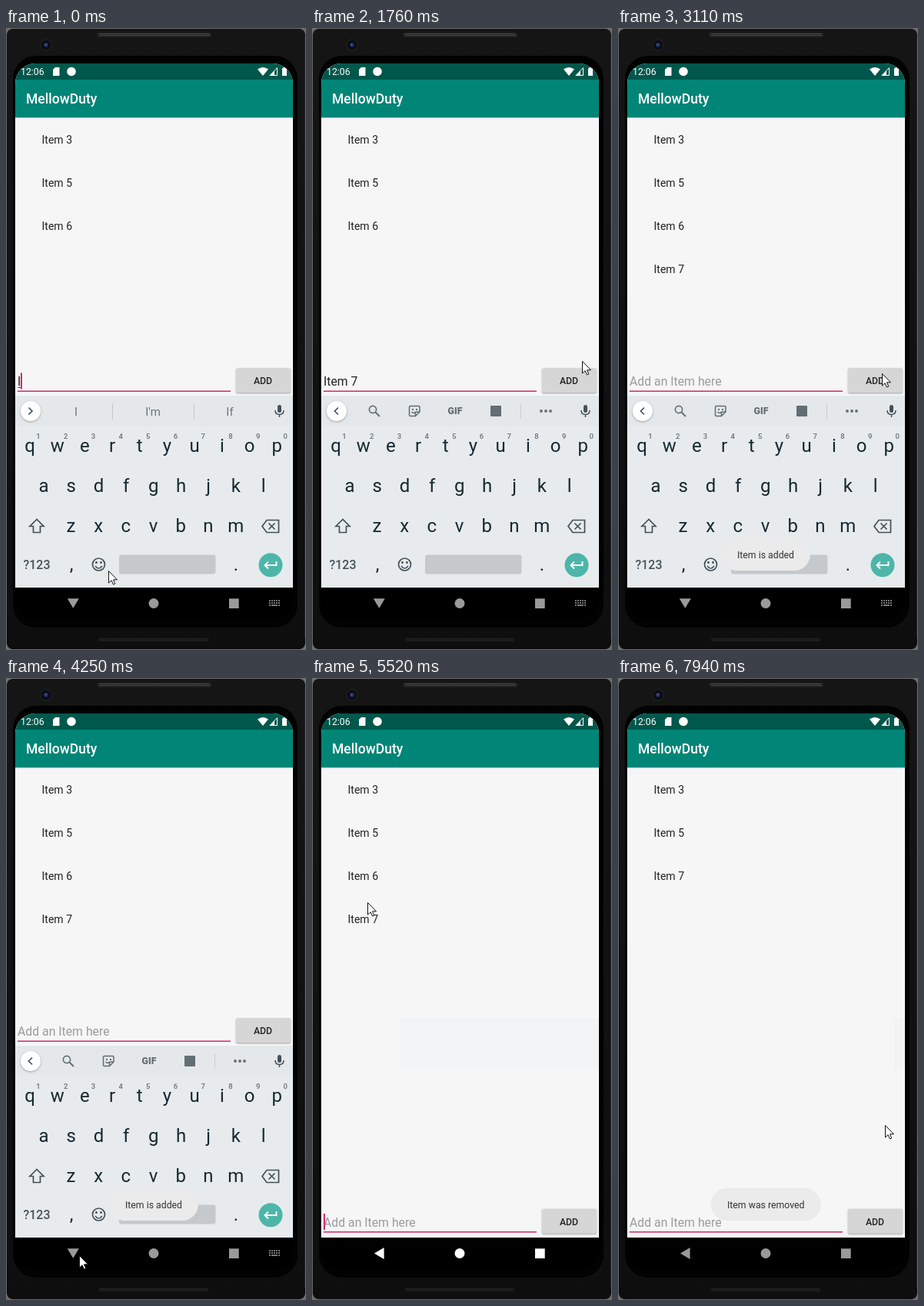
Animation of 390x807 px, one loop 8 s. Source, as an HTML page with a canvas:

```html
<!DOCTYPE html>
<html lang="en">
<head>
<meta charset="utf-8">
<title>List app</title>
<style>
html, body { margin: 0; width: 100%; height: 100%; overflow: hidden; background: #000; }
canvas { display: block; }
</style>
</head>
<body>
<canvas id="stage" width="390" height="807"></canvas>
<script>
const LOOP = 8000;
const STEP = 125;
const BLINK = 485;
const ADD = 2600;
const HIDE = 4770;
const REMOVE = 6920;
const DP = 361 / 411;
const ACCENT = '#d02b67';

const stage = document.getElementById('stage');
const layer = document.createElement('canvas');
layer.width = 390;
layer.height = 807;
const main = stage.getContext('2d');
const keys = layer.getContext('2d');
let g = main;

const ramp = (t, a, b) => Math.min(1, Math.max(0, (t - a) / (b - a)));
const easeOut = p => 1 - (1 - p) ** 3;
const stepped = t => Math.floor(t / STEP) * STEP;

function pointer(t) {
  const pos = { x: 133, y: 704 };
  const move = (from, to, x, y) => {
    const p = easeOut(ramp(stepped(t), from, to));
    pos.x += (x - pos.x) * p;
    pos.y += (y - pos.y) * p;
  };
  move(1200, 1875, 352, 430);
  move(1875, 2125, 343, 448);
  move(3230, 3800, 95, 779);
  move(3800, 4250, 95, 749);
  move(4880, 5900, 71, 262);
  move(7600, 7875, 347, 580);
  return pos;
}

function typed(t) {
  if (t >= ADD) return '';
  const count = t < 880 ? Math.min(5, 1 + Math.floor(t / 120)) : 6;
  return 'Item 7'.slice(0, count);
}

function caretOn(t) {
  const edited = t >= ADD ? ADD : t >= 880 ? 880 : t;
  return Math.floor((t - edited) / BLINK) % 2 === 0;
}

function rect(x, y, w, h, color) {
  g.fillStyle = color;
  g.fillRect(x, y, w, h);
}

function round(x, y, w, h, r, color) {
  g.fillStyle = color;
  g.beginPath();
  g.roundRect(x, y, w, h, r);
  g.fill();
}

function disc(x, y, r, color) {
  g.fillStyle = color;
  g.beginPath();
  g.arc(x, y, r, 0, Math.PI * 2);
  g.fill();
}

function ring(x, y, r, color, width) {
  g.strokeStyle = color;
  g.lineWidth = width;
  g.beginPath();
  g.arc(x, y, r, 0, Math.PI * 2);
  g.stroke();
}

function fill(d, color) {
  g.fillStyle = color;
  g.fill(new Path2D(d));
}

function line(d, color, width = 1.7) {
  g.strokeStyle = color;
  g.lineWidth = width;
  g.stroke(new Path2D(d));
}

function text(str, x, y, size, color, align = 'left', weight = 400) {
  g.font = `${weight} ${size}px Roboto, sans-serif`;
  g.textAlign = align;
  g.fillStyle = color;
  g.fillText(str, x, y);
}

function shadow(blur, y, alpha) {
  g.shadowBlur = blur;
  g.shadowOffsetY = y;
  g.shadowColor = `rgba(0,0,0,${alpha})`;
}

function gray(level) {
  return `rgb(${level},${level},${level})`;
}

function grille(x, y, w, base, dot) {
  round(x, y, w, 6, 3, base);
  for (let i = 3; i < w - 3; i += 2) {
    for (let j = 0; j < 2; j++) rect(x + i + j, y + 1 + j * 2, 1, 1, dot);
  }
}

function drawBody() {
  rect(0, 0, 390, 807, '#6d6d6d');
  const shell = g.createLinearGradient(0, 0, 0, 807);
  shell.addColorStop(0, '#151515');
  shell.addColorStop(1, '#0e0e0e');
  round(1, 1, 388, 805, 8, shell);
  round(9, 36, 370, 742, 30, '#020202');
  rect(388, 12, 1, 780, '#232323');
  grille(118, 6, 149, '#232323', '#646464');
  grille(119, 791, 145, '#131313', '#383838');
  disc(52, 22, 8.5, '#191a1c');
  disc(52, 22, 6, '#0b0c12');
  disc(52, 22, 2.8, '#232f68');
  disc(51.5, 21.5, 1, '#5166ad');
}

function drawBars() {
  rect(12, 46, 361, 21, '#00574b');
  rect(12, 116, 361, 1, '#dcdfe8');
  rect(12, 117, 361, 1, '#eceef4');
  rect(12, 67, 361, 56 * DP, '#008577');
  text('12:06', 19, 61, 14 * DP, '#fff');
  fill('M64 51H69.5V62H61V54Z', '#fff');
  disc(85, 56.5, 5.8, '#fff');
  fill('M327 53.5Q334 48.5 341 53.5L334 62Z', '#fff');
  line('M343 61.5L352.5 51.7V61.5Z', '#fff', 1);
  fill('M343 62L349 55.5V62Z', '#fff');
  fill('M359 52.3H360.6V51H363.4V52.3H365V62H359Z', '#fff');
  text('MellowDuty', 26, 98, 20 * DP, '#fff', 'left', 500);
}

function drawList(t) {
  const items = [3, 5, 6, 7].filter(n => (n !== 7 || t >= 2870) && (n !== 6 || t < REMOVE));
  items.forEach((n, i) => text('Item ' + n, 46.5, 149.7 + 64 * DP * i, 16 * DP, '#222'));
}

function drawEntry(t) {
  const word = typed(t);
  const pressed = ramp(t, 2400, 2450) - ramp(t, 2500, 2870);
  g.save();
  if (t >= HIDE) g.translate(0, 247.5);
  text(word || 'Add an Item here', 15, 464, 18 * DP, word ? '#212121' : '#9b9b9b');
  const width = word ? g.measureText(word).width : 0;
  if (t < 480) rect(15.5, 466, width - 0.5, 1, '#444');
  rect(15, 470.5, 277, 1.5, ACCENT);
  if (caretOn(t)) rect(15 + Math.floor(width), 447.5, 2, 21, ACCENT);
  shadow(2, 1, 0.35);
  round(299, 441.3, 71, 32, 2, gray(214 - 30 * pressed));
  shadow(0, 0, 0);
  text('ADD', 334, 462, 14 * DP, '#242424', 'center', 500);
  g.restore();
}

function drawSuggestions(t) {
  const word = typed(t).trim();
  const endings = word === 'I' ? ['', "'m", 'f'] : ['', 's', "'s"];
  endings.forEach((end, i) => text(word + end, 91 + 100 * i, 503, 15, '#68747a', 'center'));
  rect(138, 487, 1, 21, '#c4c9cc');
  rect(244, 487, 1, 21, '#c4c9cc');
}

function drawTools() {
  const c = '#626e74';
  ring(79, 495, 4.6, c, 1.7);
  line('M82.5 498.5L88 504', c, 2);
  line('M128 490.5H138.5Q140 490.5 140 492V498L134.5 503.5H128Q126.5 503.5 126.5 502V492Q126.5 490.5 128 490.5ZM140 498H136Q134.5 498 134.5 500V503.5M129.5 498Q132 501 134.5 498', c, 1.5);
  rect(130, 494, 2, 2, c);
  rect(135, 494, 2, 2, c);
  text('GIF', 186, 501, 12.3, c, 'center', 900);
  round(232, 490, 14, 14, 1, c);
  rect(271, 487, 1, 20, '#c9ced1');
  for (let x = 298; x <= 310; x += 6) disc(x, 497, 1.9, c);
}

function drawLetters(letters, x, y, color) {
  [...letters].forEach((ch, i) => text(ch, x + 35.7 * i, y, 24, color, 'center'));
}

function drawKeys() {
  const ink = '#17282f';
  const icon = '#435057';
  drawLetters('qwertyuiop', 31, 550, ink);
  drawLetters('asdfghjkl', 49, 602, ink);
  drawLetters('zxcvbnm', 84.5, 653.5, ink);
  for (let i = 0; i < 10; i++) text((i + 1) % 10, 42 + 35.7 * i, 533, 9.5, '#657178', 'center', 500);
  line('M40 637.5L31 646.5H35.5V654.5H44.5V646.5H49Z', icon);
  line('M339 638.5H354.5V654.5H339L333 646.5ZM341.5 642.5L349.5 650.5M349.5 642.5L341.5 650.5', icon);
  text('?123', 40, 702, 16, '#46535a', 'center', 500);
  text(',', 85, 704, 24, ink, 'center');
  text('.', 299, 704, 24, ink, 'center');
  ring(120.5, 696, 8, icon, 1.7);
  disc(117.5, 693.5, 1.4, icon);
  disc(123.5, 693.5, 1.4, icon);
  line('M116 698Q120.5 704 125 698', icon, 1.5);
  round(147, 683.5, 125.5, 25, 3, '#c5c9cc');
  disc(344, 696.7, 15.5, '#4db6a9');
  line('M351.5 692V697H337M341 692.5L336.5 697L341 701.5', '#fff', 1.9);
}

function drawKeyboard(t) {
  const hidden = ramp(t < HIDE ? 0 : stepped(t), 4625, 4875);
  if (hidden === 1) return;
  g = keys;
  g.clearRect(0, 0, 390, 807);
  rect(12, 477, 361, 249, '#e7ebee');
  rect(12, 477, 361, 39, '#e4e8eb');
  const tools = t >= 1000;
  if (tools) drawTools();
  else if (t < 880) drawSuggestions(t);
  else rect(50, 478, 270, 27, '#dfe3e4');
  shadow(3, 1, 0.3);
  disc(32, 497, 13, '#fff');
  shadow(0, 0, 0);
  line(tools ? 'M34 492.5L29.5 497L34 501.5' : 'M29.5 492.5L34 497L29.5 501.5', '#455259');
  round(353, 489, 5, 10, 2.5, '#455259');
  line('M350 496Q350 501.5 355.5 501.5Q361 501.5 361 496M355.5 501.5V505', '#455259', 1.5);
  drawKeys();
  g = main;
  g.globalAlpha = 1 - hidden;
  g.drawImage(layer, 0, Math.round(58 * hidden));
  g.globalAlpha = 1;
}

function drawNav(t) {
  const color = gray(154 + 101 * (ramp(t, 4500, 4620) - ramp(t, 6800, 7220)));
  const ripple = 0.2 * (ramp(t, 4400, 4620) - ramp(t, 4700, 5000));
  round(42, 726, 92, 42, 21, `rgba(255,255,255,${ripple})`);
  g.save();
  g.translate(87.3, 746.5);
  if (t >= HIDE) g.rotate(Math.PI * (1 - ramp(stepped(t), 4750, 4875) / 2));
  fill('M-7.5 -6.3H7.5L0 6.3Z', color);
  g.restore();
  disc(192, 746.5, 6.5, color);
  rect(290, 740.3, 12.7, 12.7, color);
  if (t >= 4620) return;
  for (let y = 742; y < 750; y += 3) {
    for (let x = 342; x < 355; x += 3) rect(x, y, 2, 2, '#777');
  }
  rect(345, 748, 8, 2, '#777');
}

function drawToast(str, x, width, alpha) {
  g.globalAlpha = alpha;
  round(x, 662, width, 42, 21, '#ebebec');
  text(str, x + width / 2, 688, 14 * DP, '#333', 'center');
  g.globalAlpha = 1;
}

function drawPointer(x, y) {
  g.save();
  g.translate(Math.round(x) + 0.5, Math.round(y) + 0.5);
  const arrow = 'M0 0V15.5L3.6 12.2L6 17.5L8.3 16.5L6 11.3H11Z';
  fill(arrow, '#fff');
  line(arrow, '#111', 1);
  g.restore();
}

function draw(t) {
  const { x, y } = pointer(t);
  drawBody();
  g.save();
  g.beginPath();
  g.roundRect(12, 46, 361, 722, 26);
  g.clip();
  rect(12, 46, 361, 680, '#f6f6f6');
  rect(12, 726, 361, 42, '#000');
  drawBars();
  if (t >= HIDE) {
    const left = t < 5250 ? 12 : Math.max(114, x + 12);
    rect(left, 441, 373 - left, 66, '#f1f3f5');
  }
  drawList(t);
  drawEntry(t);
  drawKeyboard(t);
  drawNav(t);
  drawToast('Item is added', 134, 116, ramp(t, 2750, 3110) - ramp(t, 4650, 5100));
  drawToast('Item was removed', 120.5, 143.5, ramp(t, 6800, 7220));
  g.restore();
  drawPointer(x, y);
}

const start = performance.now();
function tick() {
  draw((performance.now() - start) % LOOP);
  requestAnimationFrame(tick);
}
tick();
</script>
</body>
</html>
```
